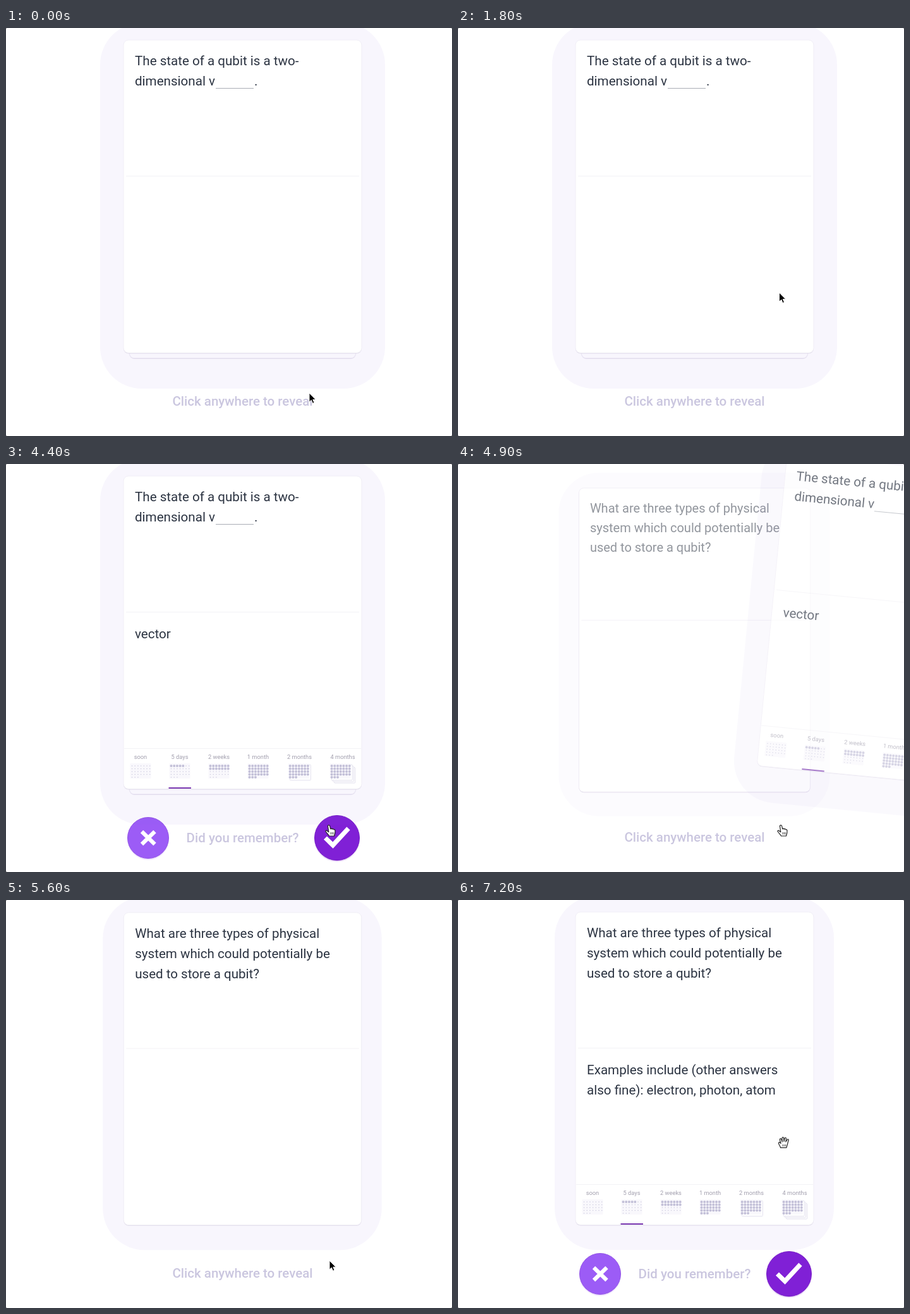
An HTML page for the animation above (8 s loop, 706 by 646 pixels).

```html
<!DOCTYPE html>
<html lang="en">
<head>
<meta charset="utf-8">
<title>Flashcard review</title>
<style>
  html, body { margin: 0; width: 100%; height: 100%; overflow: hidden; background: #fff; }
  svg { display: block; width: 706px; height: 646px; font-family: Roboto, "Liberation Sans", sans-serif; }
  .body { font-size: 20.6px; fill: #2c3442; }
  .hint { font-size: 20.5px; font-weight: 500; fill: #cac6df; text-anchor: middle; }
  .label { font-size: 9.3px; fill: #a29fae; text-anchor: middle; }
  .mark { fill: none; stroke: #fff; }
  .hand { fill: #fff; stroke: #222; stroke-width: 1.2; stroke-linejoin: round; }
</style>
</head>
<body>
<svg id="stage" viewBox="0 0 706 646"></svg>
<script>
const CARD = { x: 186, y: 19, w: 377, h: 495.5, cx: 374.5, cy: 266.75 };
const clamp = v => Math.max(0, Math.min(1, v));
const fade = (t, start, length) => clamp((t - start) / length);
const smooth = u => u * u * (3 - 2 * u);

const rect = (x, y, w, h, attrs) => `<rect x="${x}" y="${y}" width="${w}" height="${h}" ${attrs}/>`;
const lines = (rows, y) => rows.map((row, i) =>
  `<text class="body" x="204" y="${y + i * 32}">${row}</text>`).join('');

// Calendar page: the first `due` days are drawn as large dots.
function page(x, y, due) {
  let dots = '';
  for (let i = 0; i < 31; i++) {
    const big = i < due;
    dots += `<circle cx="${x + 2.5 + (i % 7) * 4.7}" cy="${y + 4 + Math.floor(i / 7) * 4.5}"
      r="${big ? 2 : 0.8}" fill="${big ? '#c3c0d8' : '#cfcde0'}"/>`;
  }
  return rect(x - 0.5, y, 33, 24, 'rx="1" fill="#f9f8fc"') + dots;
}

function stackedPage(x, y, layers) {
  let out = '';
  for (let i = layers; i > 0; i--) {
    out += rect(x + i * 2.2, y + i * 2.2, 33, 24.5, 'rx="1" fill="#fff" stroke="#e3e1ee"');
  }
  return out + page(x, y, 31);
}

function schedule() {
  const slots = [['soon', 213, 0], ['5 days', 275, 5], ['2 weeks', 337, 14],
                 ['1 month', 399, 31], ['2 months', 464.5, 31, 1], ['4 months', 533, 31, 3]];
  const icons = slots.map(([name, cx, due, layers]) => {
    const x = cx - (layers ? 16 + layers * 1.3 : 16);
    return `<text class="label" x="${cx}" y="467">${name}</text>` +
      (layers ? stackedPage(x, 474, layers) : page(x, 474, due));
  }).join('');
  return rect(187, 450, 375, 1, 'fill="#f3f2f6"') + icons +
    rect(257.5, 512, 35.5, 2, 'fill="#7a38b0"');
}

function card(id, halo, question, answer, extra = '') {
  const { x, y, w, h } = CARD;
  return `<g id="${id}">
    <rect class="halo" x="${halo[0]}" y="${halo[1]}" width="${halo[2]}" height="${halo[3]}"
      rx="66" fill="#8060d0" fill-opacity=".055"/>
    ${rect(x, y + 1, w, h, 'rx="8" fill="#ddd8e7"')}
    ${rect(x, y, w, h, 'rx="8" fill="#fff" stroke="#eeebf4" stroke-width=".8"')}
    ${rect(190, 234, 369, 1, 'fill="#f3f2f6"')}
    <g class="question">${lines(question, 59)}${extra}</g>
    <g class="answer">${lines(answer, 276)}</g>
    <g class="strip">${schedule()}</g>
  </g>`;
}

const button = (x, r, fill, edge, mark) => `
  <circle cx="${x}" cy="594" r="${r}" fill="${fill}" opacity=".14"/>
  <circle cx="${x}" cy="592" r="${r - 0.5}" fill="${fill}" stroke="${edge}"/>${mark}`;

const stage = document.getElementById('stage');
stage.innerHTML =
  card('next', [153, -6, 442, 560],
    ['What are three types of physical', 'system which could potentially be', 'used to store a qubit?'],
    ['Examples include (other answers', 'also fine): electron, photon, atom']) +
  `<text id="hint" class="hint" x="374.5" y="598">Click anywhere to reveal</text>
  <g id="grading">
    <text class="hint" x="374.5" y="599">Did you remember?</text>
    ${button(225, 33, '#9c5cf6', '#9456e6',
      '<path class="mark" stroke-width="6.3" d="M215 582L235.5 602M235.5 582L215 602"/>')}
    ${button(524, 36, '#8020d6', '#761bc6',
      '<path class="mark" stroke-width="7.2" d="M505.5 592L517.5 603.5L542 577"/>')}
  </g>` +
  card('first', [149, -8, 451, 579],
    ['The state of a qubit is a two-', 'dimensional v'], ['vector'],
    rect(332, 95, 60, 1, 'fill="#a9adb5"') + '<text class="body" x="393" y="91">.</text>') +
  `<g id="cursor">
    <path id="arrow" stroke="#fff" d="M0 0V14.3L3.3 11.2L5.6 16.4L8 15.3L5.8 10.3H10.2Z"/>
    <g id="grab" class="hand" transform="translate(1 2)">
      <path d="M-5 8.2C-5 6-8 3-8 1C-8-1-6-1-4.5 1.5L-6-4C-6.5-6.5-4-7-3.3-4.5L-2.3-1L-2.5-6.5C-2.5-9 0-9 .2-6.5L.5-1.5L1.5-6.5C2-8.5 4.3-8 4-5.8L3.3-1L5.3-4C6.5-6 8.3-4.8 7.5-3C6.5-.5 6.5 2 5.5 4L4.5 8.2Z"/>
      <path d="M-1.5 3V6M.8 3V6M3 3V6" stroke-width=".8"/>
    </g>
    <g id="point" class="hand">
      <path d="M-2.5 .5C-2.8-1.5 .2-1.8 .6 .2L1.8 5C2.5 3.8 4 4 4.3 5.3C5 4.2 6.6 4.6 6.8 6C7.8 5.2 9 6 9 7.5L8.8 11L7.5 16H-.5C-1.5 13.5-4 11.5-5.5 9.5C-7 7.5-5 6.5-3.5 8L-1.2 9.8Z"/>
      <path d="M2 10V13.5M4.2 10V13.5M6.2 10V13.5" stroke-width=".8"/>
    </g>
  </g>` +
  [[0, 0], [705, 0], [0, 645], [705, 645]].map(([x, y]) => rect(x, y, 1, 1, 'fill="#8a8a8a"')).join('');

const $ = selector => stage.querySelector(selector);
const parts = {};
for (const s of ['#first', '#first .answer', '#first .strip', '#next', '#next .halo', '#next .question',
  '#next .answer', '#next .strip', '#hint', '#grading', '#cursor', '#arrow', '#grab', '#point']) parts[s] = $(s);
const opacity = (selector, value) => parts[selector].setAttribute('opacity', value);
const transform = (selector, value) => parts[selector].setAttribute('transform', value);

const LOOP = 8000, REVEAL_1 = 2440, GRADE = 4650, REVEAL_2 = 6440;
const path = [[0, 480, 578], [350, 480, 578], [1200, 508, 440], [1480, 519, 428], [1800, 508.5, 419],
  [3750, 508.5, 419], [4350, 512, 573], [5550, 512, 573], [6380, 514.5, 382], [LOOP, 514.5, 382]];

function cursorAt(t) {
  const i = path.findIndex(key => key[0] > t);
  const [t0, x0, y0] = path[i - 1], [t1, x1, y1] = path[i];
  const u = smooth((t - t0) / (t1 - t0));
  return [x0 + (x1 - x0) * u, y0 + (y1 - y0) * u];
}

function cursorKind(t, y) {
  if (t < REVEAL_1 || (t > 5560 && t < REVEAL_2)) return 'arrow';
  return y < 515 ? 'grab' : y > 556 ? 'point' : 'arrow';
}

function reveal(id, age) {
  opacity(`${id} .answer`, clamp((age - 100) / 300));
  opacity(`${id} .strip`, clamp((age - 320) / 420));
}

function draw(t) {
  reveal('#first', t - REVEAL_1);
  reveal('#next', t - REVEAL_2);

  const grading = fade(t, REVEAL_1, 400) - fade(t, GRADE, 250) + fade(t, REVEAL_2, 400);
  opacity('#grading', grading);
  opacity('#hint', 1 - grading);

  // Critically damped spring drives both the leaving and the rising card.
  const k = Math.max(0, t - GRADE) * 0.0058;
  const p = 1 - (1 + k) * Math.exp(-k);
  const { cx, cy } = CARD;
  transform('#first', `translate(${726 * p} ${-41 * p}) rotate(${13 * p} ${cx} ${cy})`);
  opacity('#first', 1 - 0.8 * p);
  transform('#next', `translate(${cx} ${cy + 20.75 * (1 - p)}) scale(${0.95 + 0.05 * p}) translate(${-cx} ${-cy})`);
  opacity('#next .halo', p);
  opacity('#next .question', clamp(p * 1.2));

  const [x, y] = cursorAt(t);
  transform('#cursor', `translate(${x} ${y})`);
  const kind = cursorKind(t, y);
  for (const name of ['arrow', 'grab', 'point']) opacity('#' + name, name === kind ? 1 : 0);
}

const begin = performance.now();
function tick() {
  draw((performance.now() - begin) % LOOP);
  requestAnimationFrame(tick);
}
tick();
</script>
</body>
</html>
```
